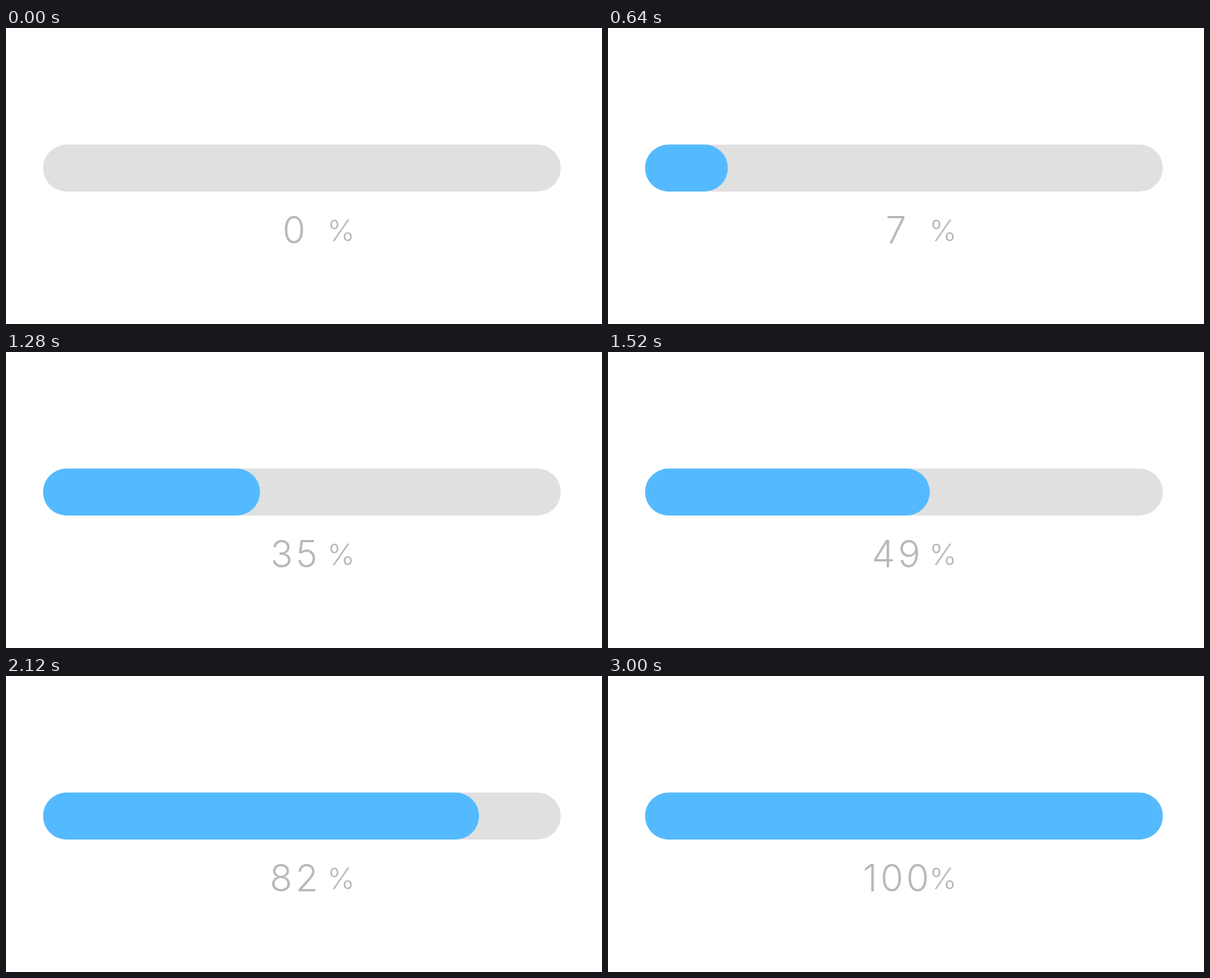
An HTML page for the animation above (3720 ms loop, 804 px wide and 400 px high).

```html
<!DOCTYPE html>
<html lang="en">
<head>
<meta charset="utf-8">
<title>Progress bar</title>
<style>
  html, body { margin: 0; width: 100%; height: 100%; overflow: hidden; background: #fff; }
  svg { display: block; width: 804px; height: 400px; }
  text { font-family: Inter, "Open Sans", sans-serif; font-weight: 350; fill: #b8b8b8; }
  #count { font-size: 50px; letter-spacing: 4px; text-anchor: middle; }
  #sign { font-size: 40px; text-anchor: middle; }
</style>
</head>
<body>
<svg viewBox="0 0 804 400">
  <rect x="50" y="157.5" width="698.5" height="63.5" rx="31.75" fill="#e0e0e0"/>
  <rect id="fill" x="50" y="157.5" width="0" height="63.5" rx="31.75" fill="#54baff"/>
  <text id="count" x="390.5" y="291">0</text>
  <text id="sign" x="452" y="287.5">%</text>
</svg>
<script>
  const LOOP = 3720, STEP = 40, START = 120;
  const MIN_WIDTH = 64, MAX_WIDTH = 698.5;
  const fill = document.getElementById('fill');
  const count = document.getElementById('count');

  // Cubic Bezier easing with y handles at 0 and 1.
  function ease(x, x1, x2) {
    if (x <= 0) return 0;
    if (x >= 1) return 1;
    let lo = 0, hi = 1;
    for (let i = 0; i < 30; i++) {
      const s = (lo + hi) / 2, r = 1 - s;
      if (3 * x1 * s * r * r + 3 * x2 * s * s * r + s * s * s < x) lo = s;
      else hi = s;
    }
    return lo * lo * (3 - 2 * lo);
  }

  const progress = (t, from, to, x1, x2) => ease((t - from) / (to - from), x1, x2);

  function draw() {
    const t = Math.floor((performance.now() % LOOP) / STEP) * STEP;
    const grown = progress(t, 80, 3000, 0.425, 0.55);
    const counted = progress(t, 120, 2960, 0.42, 0.58);
    const width = t < START ? 0 : MIN_WIDTH + (MAX_WIDTH - MIN_WIDTH) * grown;
    fill.setAttribute('width', width);
    count.textContent = Math.round(100 * counted);
    requestAnimationFrame(draw);
  }
  draw();
</script>
</body>
</html>
```
